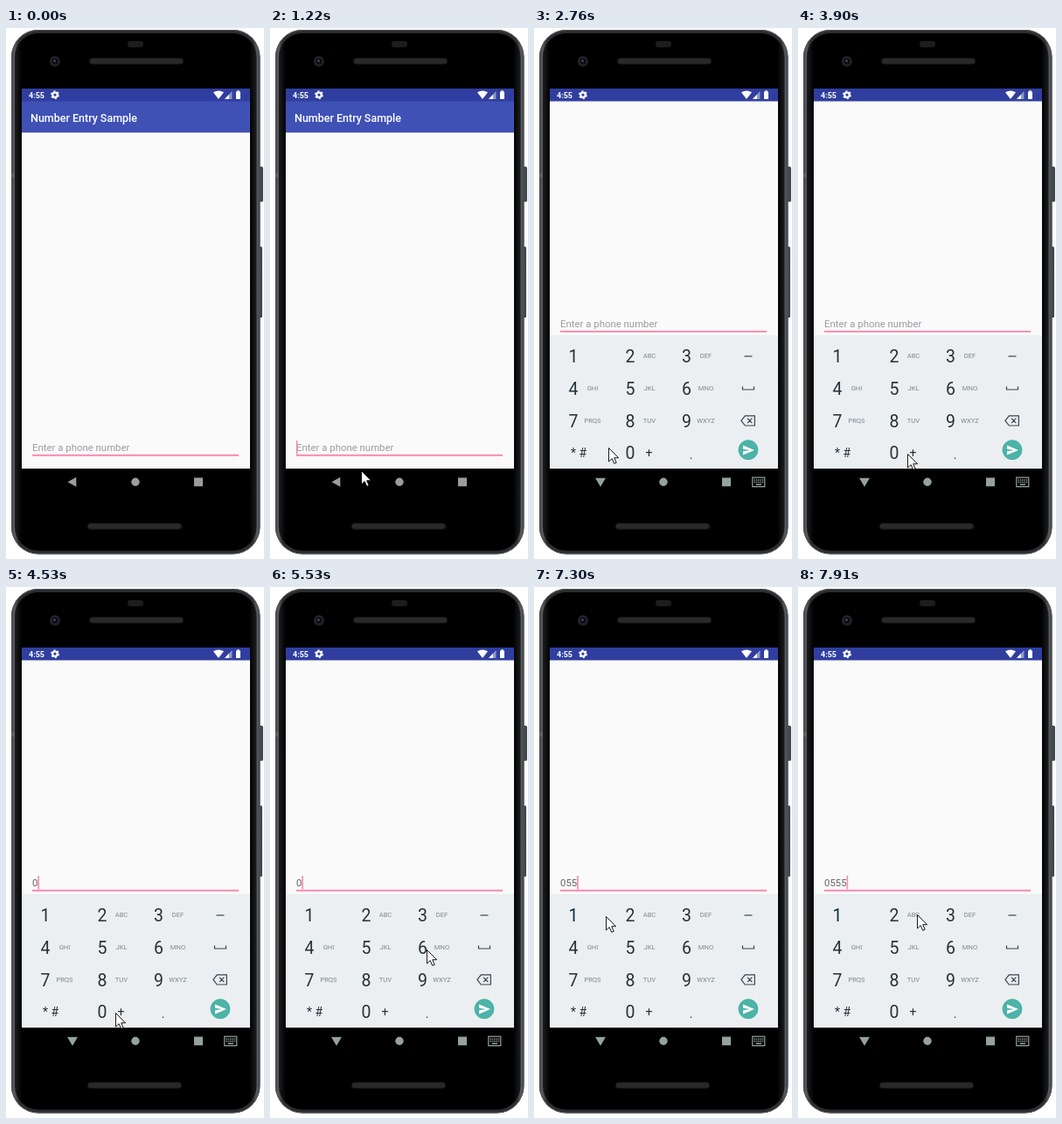
An HTML page that plays this animation: 295 by 605 pixels, repeating every 7.99 s.

```html
<!DOCTYPE html>
<html lang="en">
<head>
<meta charset="utf-8">
<title>Phone keypad entry</title>
<style>
  html, body { margin: 0; width: 100%; height: 100%; overflow: hidden; background: #fff; }
  svg { display: block; width: 295px; height: 605px; font-family: Roboto, sans-serif; }
  .digit { font-size: 19.5px; fill: #263238; text-anchor: middle; }
  .sub { font-size: 7.6px; fill: #7b878d; text-anchor: middle; }
  .sym { font-size: 14px; fill: #263238; text-anchor: middle; }
  .line { fill: none; stroke: #37474f; stroke-width: 1.2; }
</style>
</head>
<body>
<svg viewBox="0 0 295 605">
  <defs>
    <linearGradient id="rim">
      <stop offset="0" stop-color="#34373b"/>
      <stop offset=".012" stop-color="#5a5d61"/>
      <stop offset=".03" stop-color="#2b2d30"/>
      <stop offset=".97" stop-color="#2b2d30"/>
      <stop offset=".988" stop-color="#5a5d61"/>
      <stop offset="1" stop-color="#34373b"/>
    </linearGradient>
    <linearGradient id="glass">
      <stop offset="0" stop-color="#1c1d1f"/>
      <stop offset=".03" stop-color="#000"/>
      <stop offset=".97" stop-color="#000"/>
      <stop offset="1" stop-color="#1c1d1f"/>
    </linearGradient>
    <clipPath id="view"><rect x="18" y="83" width="261" height="419"/></clipPath>
  </defs>

  <!-- body -->
  <g fill="#44474b">
    <rect x="288" y="158" width="6" height="40" rx="1.5"/>
    <rect x="288" y="249" width="5" height="81" rx="1.5"/>
  </g>
  <rect x="6" y="2" width="284.5" height="597.5" rx="31" fill="url(#rim)"/>
  <rect x="6.5" y="2.5" width="283.5" height="596.5" rx="30.5" fill="none" stroke="#55585c"/>
  <rect x="10" y="6" width="276.5" height="589.5" rx="27" fill="url(#glass)"/>
  <path d="M6 168h4" stroke="#777" stroke-width="5" opacity=".45"/>
  <rect x="139" y="15" width="18" height="7" rx="3" fill="#1d1d1f"/>
  <g fill="#29292b" stroke="#1a1a1b">
    <rect x="95.5" y="34.5" width="107" height="6.5" rx="3"/>
    <rect x="93.5" y="564.5" width="107" height="6.5" rx="3"/>
  </g>
  <circle cx="56" cy="38" r="6" fill="#222329"/>
  <circle cx="56" cy="38" r="3.4" fill="#0b0d14"/>
  <circle cx="55.5" cy="37.5" r="1.3" fill="#4b5068"/>
  <rect x="18" y="69" width="261" height="464" fill="#000"/>

  <!-- app -->
  <g clip-path="url(#view)">
    <g id="app">
      <rect x="18" y="83" width="261" height="419" fill="#fafafa"/>
      <rect x="18" y="119" width="261" height="1" fill="#d5d5da"/>
      <rect x="18" y="83" width="261" height="36" fill="#3f51b5"/>
      <text x="28" y="106.5" font-size="12.5" font-weight="500" fill="#fff">Number Entry Sample</text>
      <text id="entry" x="30" y="482" font-size="11.4"></text>
      <rect x="30" y="485.8" width="236" height="2" fill="#f78bae"/>
      <rect id="caret" x="30" y="470" width="1.6" height="15.5" fill="#f78bae"/>
    </g>
  </g>

  <!-- status bar -->
  <rect x="18" y="69" width="261" height="14.5" fill="#303f9f"/>
  <g fill="#fff">
    <text x="26" y="79.6" font-size="9" font-weight="700">4:55</text>
    <path d="M237 73.3Q243 69.7 249 73.3L243 81Z"/>
    <path d="M250 81L258.5 72V81Z" opacity=".45"/>
    <path d="M250 81L255 75.7V81Z"/>
    <path d="M263 72.5h1.3v-1.2h2.4v1.2H268V81h-5Z"/>
  </g>
  <circle cx="56" cy="76.2" r="2.7" fill="none" stroke="#fff" stroke-width="2.2"/>
  <circle cx="56" cy="76.2" r="4.2" fill="none" stroke="#fff" stroke-width="1.5" stroke-dasharray="2.2 2.2"/>

  <!-- keyboard -->
  <g id="ime">
    <rect x="18" y="350" width="261" height="152" fill="#eceff1"/>
    <rect id="press" width="64.3" height="36.6" fill="#cfd8dc"/>
    <g id="keys"></g>
    <text class="sym" x="51" y="489">* #</text>
    <text class="sym" x="131.5" y="489">+</text>
    <text class="sym" x="179.5" y="491">.</text>
    <path class="line" d="M240.5 374h9" stroke-width="1.5"/>
    <path class="line" d="M238.5 408.5v3.5h13v-3.5"/>
    <path class="line" d="M237 447.4L241.3 441.9H252.4V453H241.3ZM244 444.7l5.4 5.4m0-5.4l-5.4 5.4"/>
    <circle cx="245" cy="480.7" r="11.4" fill="#4bb3a7"/>
    <path d="M239 475.5L252 481L239 486.5V482.2L247 481L239 479.8Z" fill="#fff"/>
  </g>

  <!-- navigation -->
  <g id="nav">
    <path id="back"/>
    <circle cx="148" cy="517.3" r="4.7"/>
    <rect x="215" y="512.4" width="10" height="9.8"/>
    <g id="switch">
      <path d="M249.8 512.2h14v10.4h-14Z" fill="none" stroke="currentColor" stroke-width="1.2"/>
      <path d="M251.6 515h10.6M251.6 517.6h10.6" fill="none" stroke="currentColor" stroke-width="1.5" stroke-dasharray="1.4 .9"/>
      <path d="M253.7 519.6h6.4v1.5h-6.4Z"/>
    </g>
  </g>

  <path id="mouse" d="M.5 .5V16L4.2 12.6L6.7 18.3L9.2 17.2L6.7 11.7H11.6Z" fill="#fff" stroke="#000" stroke-width=".9"/>
</svg>
<script>
const LOOP = 7990, STEP = LOOP / 104;
const $ = id => document.getElementById(id);
const clamp = v => Math.max(0, Math.min(1, v));
const show = (id, on) => $(id).setAttribute('visibility', on ? 'visible' : 'hidden');
const move = (id, x, y) => $(id).setAttribute('transform', `translate(${x} ${y})`);

const colX = [45, 110, 174.5];
const rowY = [381, 418, 454.6, 491.2];
const subs = ['', 'ABC', 'DEF', 'GHI', 'JKL', 'MNO', 'PRQS', 'TUV', 'WXYZ'];

function label(cls, x, y, str) {
  const el = document.createElementNS('http://www.w3.org/2000/svg', 'text');
  el.setAttribute('class', cls);
  el.setAttribute('x', x);
  el.setAttribute('y', y);
  el.textContent = str;
  $('keys').append(el);
  return el;
}
const digits = subs.map((sub, i) => {
  const x = colX[i % 3], y = rowY[i / 3 | 0];
  label('sub', x + 22, y - 4.6, sub);
  return label('digit', x, y, i + 1);
});
label('digit', colX[1], rowY[3], 0);

// time, x, y
const path = [
  [745, 115, 592], [1229, 104, 504], [1530, 86, 481], [1760, 84, 477], [2590, 84, 477],
  [2760, 85, 478], [2900, 85, 478], [3670, 145, 485], [3820, 145, 485], [3905, 125, 485],
  [5040, 125, 485], [5520, 179, 413], [6215, 179, 413], [6680, 48, 377], [7060, 48, 377],
  [7600, 124, 373], [7840, 124, 373], [7900, 136, 373]
];
// moments the caret flips, starting hidden
const flips = [60, 595, 1125, 1590, 1890, 2590, 3110, 3620, 4055, 5045, 5520, 6310, 6825, 7570, 7740];
// down, up, column, row
const taps = [[4360, 4515, 1, 3], [5745, 5820, 2, 1], [6980, 7055, 0, 0], [7670, 7745, 1, 0]];
const number = '0555';

function pointer(t) {
  const i = path.findIndex(p => p[0] > t);
  if (i < 1) return path[path.length - 1];
  const [a, b] = [path[i - 1], path[i]];
  const k = (t - a[0]) / (b[0] - a[0]);
  return a.map((v, j) => v + (b[j] - v) * k);
}

function draw(t) {
  const pan = Math.round(141 * (1 - (1 - clamp((t - 1990) / 375)) ** 3));
  move('app', 0, -pan);

  const open = t > 2050;
  show('ime', open);
  move('ime', 0, Math.round(28 * (1 - clamp((t - 2000) / 380))));
  $('ime').setAttribute('opacity', clamp((t - 2010) / 200));

  const tint = !open ? '#9c9c9c' : t < 2370 ? '#dcd8d8' : '#93a39f';
  $('nav').setAttribute('fill', tint);
  $('nav').setAttribute('color', tint);
  $('back').setAttribute('d', open ? 'M70 512.8H82L76 522.8Z' : 'M70.5 517.3L80.3 511.8V522.8Z');
  show('switch', open);

  const count = taps.filter(p => t >= p[1]).length;
  const entry = $('entry');
  entry.textContent = count ? number.slice(0, count) : 'Enter a phone number';
  entry.setAttribute('fill', count ? '#626262' : '#9b9ba3');
  $('caret').setAttribute('x', 30 + count * 6.4);
  show('caret', flips.filter(f => t >= f).length % 2);

  const tap = taps.find(p => t >= p[0] && t < p[1]);
  show('press', open && tap);
  if (tap) move('press', 18.7 + tap[2] * 64.3, 356 + tap[3] * 36.6);
  digits[0].style.fill = t > 7060 ? '#0b2a3a' : '';

  const [, x, y] = pointer(t);
  show('mouse', t >= path[0][0]);
  move('mouse', Math.round(x), Math.round(y));
}

const start = performance.now();
function tick() {
  const t = (performance.now() - start) % LOOP;
  draw(Math.floor(t / STEP + .25) * STEP);
  requestAnimationFrame(tick);
}
tick();
</script>
</body>
</html>
```
